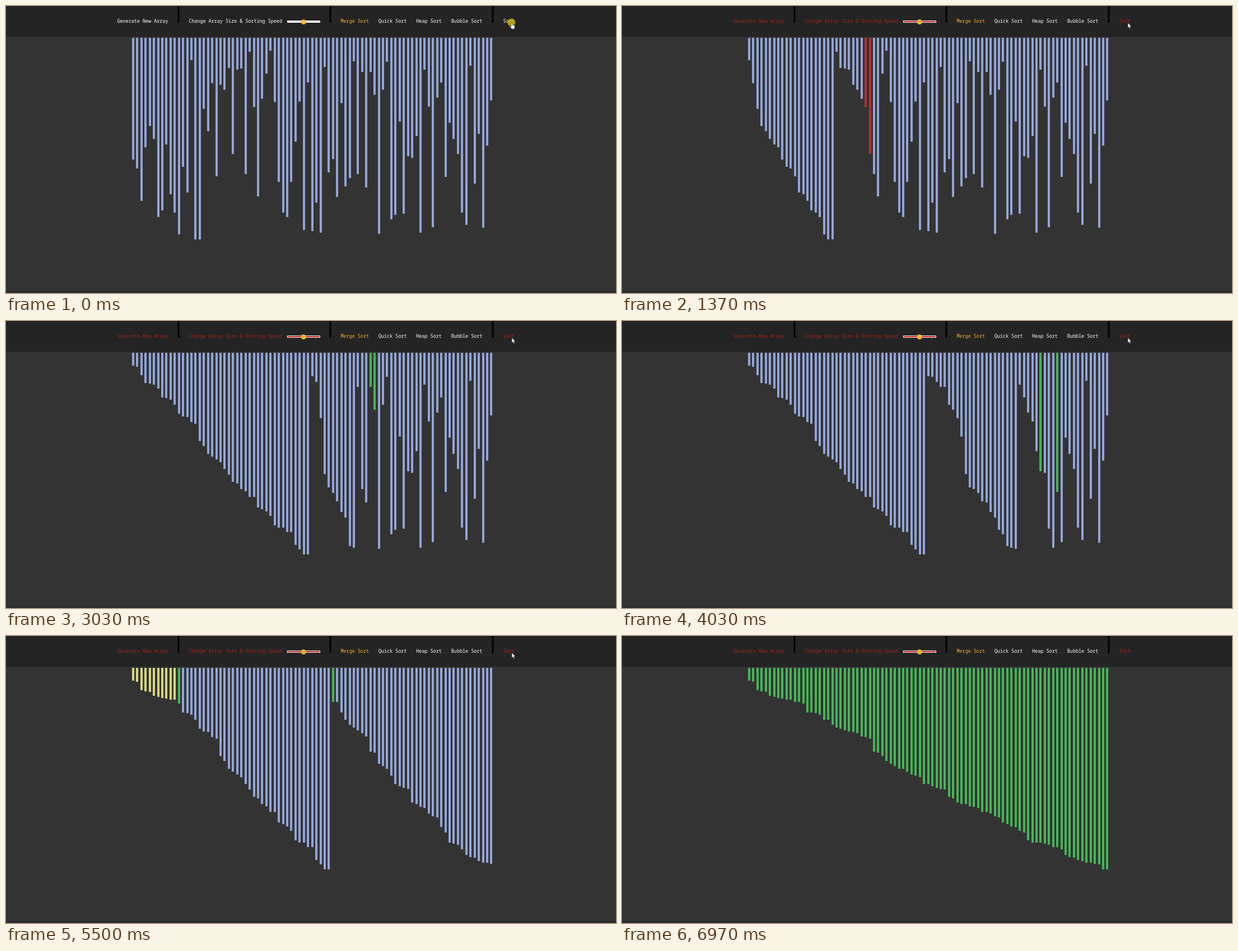
Recreate the animation shown at these times as an HTML page. Size 1089 by 514 pixels, loop 7200 ms.

```html
<!DOCTYPE html>
<html lang="en">
<head>
<meta charset="utf-8">
<title>Merge sort</title>
<style>
  html, body { margin: 0; width: 100%; height: 100%; overflow: hidden; background: #333; }
  svg { display: block; width: 1089px; height: 514px; }
  text { font: 500 8.44px "Noto Sans Mono", "DejaVu Sans Mono", monospace; fill: #fff; white-space: pre; }
  .picked { fill: #fbae2c; }
  .busy .lock { fill: #b01e1e; }
  .track { fill: #fff; stroke: #fff; stroke-width: 1; }
  .busy .track { fill: #c01818; }
</style>
</head>
<body>
<svg id="stage" viewBox="0 0 1089 514">
  <rect width="1089" height="514" fill="#333"/>
  <rect y="510" width="1089" height="4" fill="#2e2e2e"/>
  <rect width="1089" height="55" fill="#242424"/>
  <path d="M308 0V30M579 0V30M869 0V30" stroke="#000" stroke-width="3"/>
  <text class="lock" x="198.5" y="30">Generate New Array</text>
  <text class="lock" x="326.2" y="30">Change Array Size &amp; Sorting Speed</text>
  <rect class="track" x="502.5" y="26.5" width="58" height="3"/>
  <circle cx="531.2" cy="28.5" r="4.6" fill="#f6b632"/>
  <text class="picked" x="597.5" y="30">Merge Sort</text>
  <text x="664.8" y="30">Quick Sort</text>
  <text x="732.3" y="30">Heap Sort</text>
  <text x="794.8" y="30">Bubble Sort</text>
  <text class="lock" x="887.6" y="30">Sort</text>
  <g id="bars"></g>
  <g id="hand">
    <circle cx="902.3" cy="29.5" r="7" fill="#c9ae12" opacity=".85"/>
    <path d="M902 30.5q1.2-1.2 2 0v3.4l3.6 1q1 .4 .8 1.600l-.8 4.700h-4.800l-2.900-4.200q0-1.200 1.300-.8l.8.6z"
      fill="#fff" stroke="#222" stroke-width=".6"/>
  </g>
  <path id="arrow" d="M0 0V9.200L2.100 7.300L3.500 10.500L5 9.900L3.600 6.800H6.300Z" fill="#fff" stroke="#111" stroke-width=".5"/>
</svg>
<script>
const LOOP = 7200, TICK = 47.41, TOP = 57;
const BLUE = '#92a5d8', GREEN = '#45b556', RED = '#b93030', YELLOW = '#d6d57f';
const stage = document.getElementById('stage');
const hand = document.getElementById('hand');
const arrow = document.getElementById('arrow');

// lower end of each bar
const ends = [
  275, 291, 349, 253, 215, 238, 378, 366, 248, 337, 370, 409, 288, 334, 97, 418, 418, 184, 224, 138, 305, 141,
  150, 111, 265, 114, 112, 301, 82, 181, 341, 166, 121, 80, 172, 315, 370, 378, 315, 243, 171, 401, 137,
  403, 352, 406, 109, 298, 274, 342, 174, 323, 308, 99, 301, 118, 325, 118, 159, 408, 150, 100, 382, 374, 207,
  372, 269, 272, 233, 406, 114, 180, 396, 164, 137, 306, 209, 238, 265, 370, 392, 107, 318, 229, 397, 250, 169
];
const count = ends.length;

const bars = ends.map((_, i) => {
  const bar = document.createElementNS('http://www.w3.org/2000/svg', 'rect');
  bar.setAttribute('x', Math.round(224.9 + 7.436 * i));
  bar.setAttribute('y', TOP);
  bar.setAttribute('width', 4);
  return document.getElementById('bars').appendChild(bar);
});

// run the in-place merge sort once and log every visible step
const steps = [];
const list = ends.slice();
const log = (i, j, color, placed = 0) => steps.push({ list: list.slice(), i, j, color, placed });

function merge(lo, mid, hi) {
  const last = hi - lo === count;
  let i = lo, j = mid;
  while (i < j && j < hi) {
    const placed = last ? i : 0;
    log(i, j, GREEN, placed);
    if (list[i] > list[j]) {
      list.splice(i, 0, list.splice(j, 1)[0]);
      log(i, j, RED, placed);
      j++;
    } else if (last) {
      log(-1, -1, BLUE, i + 1);
    }
    i++;
  }
  if (last) while (i < hi) log(-1, -1, BLUE, ++i);
}

function sort(lo, hi) {
  if (hi - lo < 2) return;
  const mid = (lo + hi) >> 1;
  sort(lo, mid);
  sort(mid, hi);
  merge(lo, mid, hi);
}

log(-1, -1, BLUE);
sort(0, count);

// [tick, values...]
const pace = [[1, 0], [29, 143], [46, 229], [64, 319], [85, 427], [112, 569], [116, 589], [128, 647], [147, 738]];
const path = [[125, 903, 30], [128, 946, 82], [130, 972, 124], [136, 1050, 457], [138, 1059, 525]];

function at(keys, k) {
  if (k <= keys[0][0]) return keys[0].slice(1);
  for (let n = 1; n < keys.length; n++) {
    const [a, ...from] = keys[n - 1], [b, ...to] = keys[n];
    if (k <= b) return from.map((v, c) => v + (to[c] - v) * (k - a) / (b - a));
  }
  return keys[keys.length - 1].slice(1);
}

let shown = -1;
function draw(k) {
  const n = Math.round(at(pace, k)[0]);
  const over = k >= 147;
  const step = steps[Math.min(n, steps.length - 1)];
  bars.forEach((bar, x) => {
    const color = over ? GREEN
      : x === step.i || x === step.j ? step.color
      : x < step.placed ? YELLOW : BLUE;
    bar.setAttribute('height', step.list[x] - TOP);
    bar.setAttribute('fill', color);
  });
  stage.classList.toggle('busy', k > 0);
  hand.style.display = k < 1 ? '' : 'none';
  arrow.style.display = k < 1 ? 'none' : '';
  const [x, y] = at(path, k);
  arrow.setAttribute('transform', `translate(${x} ${y})`);
}

function tick() {
  const k = Math.min(147, Math.floor((performance.now() % LOOP + 8) / TICK));
  if (k !== shown) draw(shown = k);
  requestAnimationFrame(tick);
}
tick();
</script>
</body>
</html>
```
